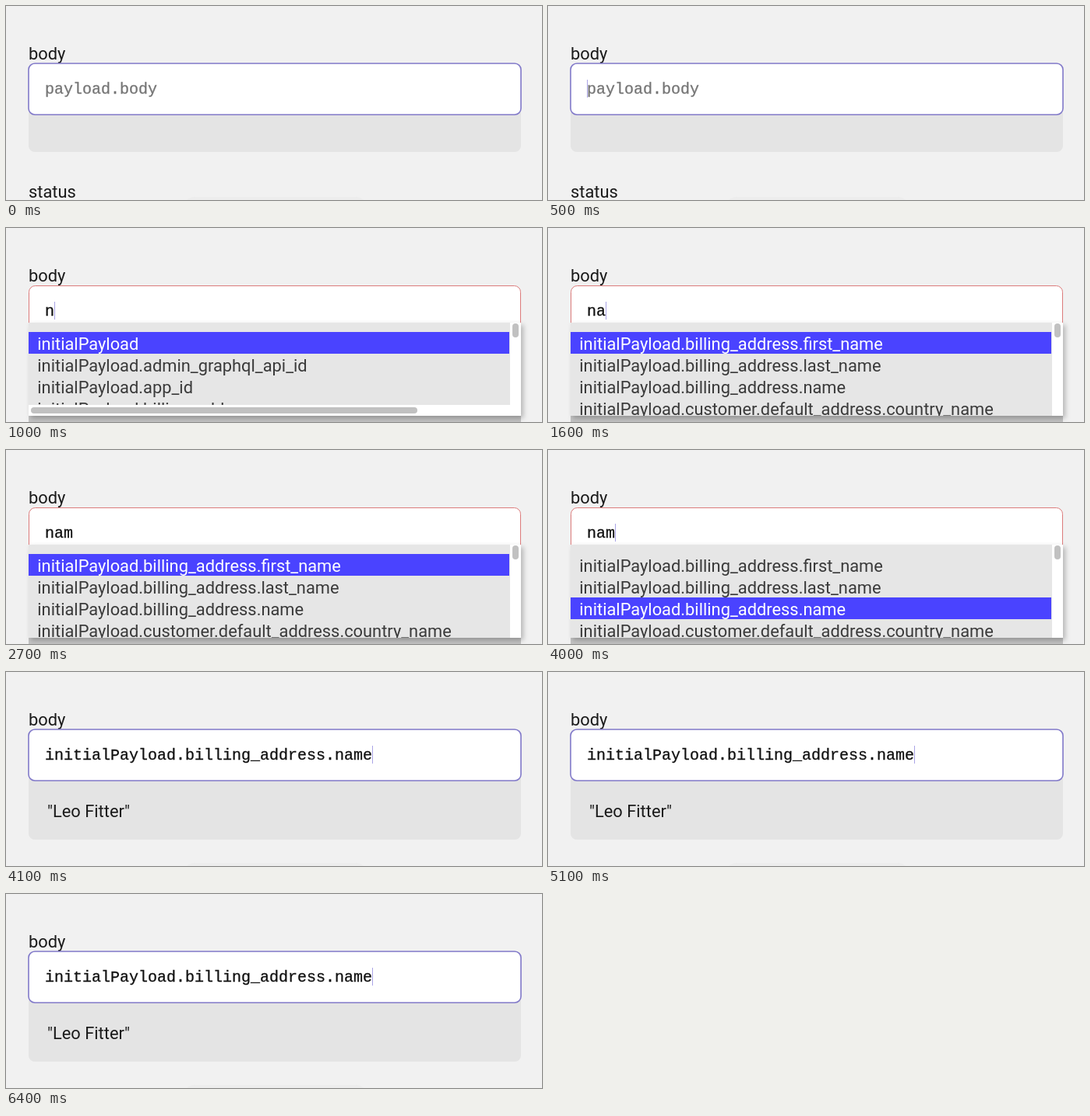
Write an HTML page that moves like this. It is 688x250 px and loops after 6500 ms.

```html
<!DOCTYPE html>
<html lang="en">
<head>
<meta charset="utf-8">
<title>Autocomplete field</title>
<style>
  html, body { margin: 0; width: 100%; height: 100%; overflow: hidden; background: #f1f1f1; }
  svg { display: block; }
  text { font: 21.85px Roboto, "Open Sans", sans-serif; fill: #1a1a1a; white-space: pre; }
  #value { font: 20px "Liberation Mono", "DejaVu Sans Mono", monospace; fill: #111; stroke: #111; stroke-width: .3px; }
  #value.hint { fill: #757575; stroke: #757575; }
  #field { fill: #fff; stroke: #8179c9; stroke-width: 1.6px; }
  #field.bad { stroke: #dc7b7b; stroke-width: 1px; }
  #rows text { fill: #3a3a3a; }
  #rows text.on { fill: #fff; }
  #menu { filter: drop-shadow(3px 3px 3px rgba(0, 0, 0, .25)); }
</style>
</head>
<body>
<svg width="688" height="250" viewBox="0 0 688 250">
  <clipPath id="clip"><rect x="29" y="122" width="618" height="120"/></clipPath>
  <text x="29" y="69">body</text>
  <text id="status" x="29" y="247">status</text>
  <rect x="228" y="246" width="235" height="30" rx="14" fill="#ededed"/>
  <rect id="result" x="29" y="130" width="632" rx="8"/>
  <rect id="field" rx="8"/>
  <text id="value" x="50" y="113"></text>
  <rect id="caret" y="95" width="1" height="23" fill="#aaa4e6"/>
  <text id="answer" x="53" y="187">"Leo Fitter"</text>
  <g id="menu">
    <rect x="29" y="122" width="632" height="120" fill="#fff"/>
    <g clip-path="url(#clip)">
      <rect x="29" y="122" width="618" height="120" fill="#e6e6e6"/>
      <rect id="mark" x="29" width="617" height="28" fill="#4a43ff"/>
      <g id="rows"></g>
    </g>
    <rect x="650" y="123" width="8" height="18" rx="4" fill="#c1c1c1"/>
    <g id="bar">
      <rect x="29" y="228" width="632" height="14" fill="#fff"/>
      <rect x="32" y="231" width="496" height="8" rx="4" fill="#c1c1c1"/>
    </g>
  </g>
</svg>
<script>
const LOOP = 6500, OPEN = 1000, PICK = 4100;
const CHOICE = "initialPayload.billing_address.name";
const ALL = ["", ".admin_graphql_api_id", ".app_id", ".billing_address"];
const NAMES = [".billing_address.first_name", ".billing_address.last_name",
  ".billing_address.name", ".customer.default_address.country_name"];

const $ = id => document.getElementById(id);
const set = (id, attrs) => {
  for (const k in attrs) $(id).setAttribute(k, attrs[k]);
};
const show = (id, on) => set(id, { visibility: on ? "visible" : "hidden" });

for (let i = 0; i < 4; i++) {
  $("rows").insertAdjacentHTML("beforeend", `<text x="40.3" y="${157 + 28 * i}"></text>`);
}

function draw(t) {
  const open = t >= OPEN && t < PICK, done = t >= PICK;
  const typed = done ? CHOICE : "nam".slice(0, Math.max(0, Math.floor(t / 500) - 1));

  $("value").textContent = typed || "payload.body";
  set("value", { class: typed ? "" : "hint" });

  // The thin error border sits on whole pixels, inside the box
  const inset = open ? 0.5 : 0;
  set("field", {
    class: open ? "bad" : "",
    x: 29 + inset, y: 74 + inset, width: 632 - 2 * inset, height: 66 - 2 * inset
  });

  // Every key press restarts the blink
  const blink = done ? t - PICK : t < 2000 ? (t < 500 ? 500 : 0) : t - 2000;
  show("caret", blink % 1000 < 500);
  set("caret", { x: 50 + 12 * typed.length });

  set("result", { height: done ? 86 : open ? 140 : 58, fill: open ? "#c2c2c2" : "#e4e4e4" });
  show("status", !open && !done);
  show("answer", done);
  show("menu", open);
  show("bar", open && t < 1500);

  const pick = t < 2800 ? 0 : t < 3900 ? 1 : 2;
  const list = t < 1500 ? ALL : NAMES;
  set("mark", { y: 134 + 28 * pick });
  [...$("rows").children].forEach((row, i) => {
    row.textContent = "initialPayload" + list[i];
    row.setAttribute("class", i === pick ? "on" : "");
  });
}

const start = performance.now();
function tick() {
  draw((performance.now() - start) % LOOP);
  requestAnimationFrame(tick);
}
tick();
</script>
</body>
</html>
```
